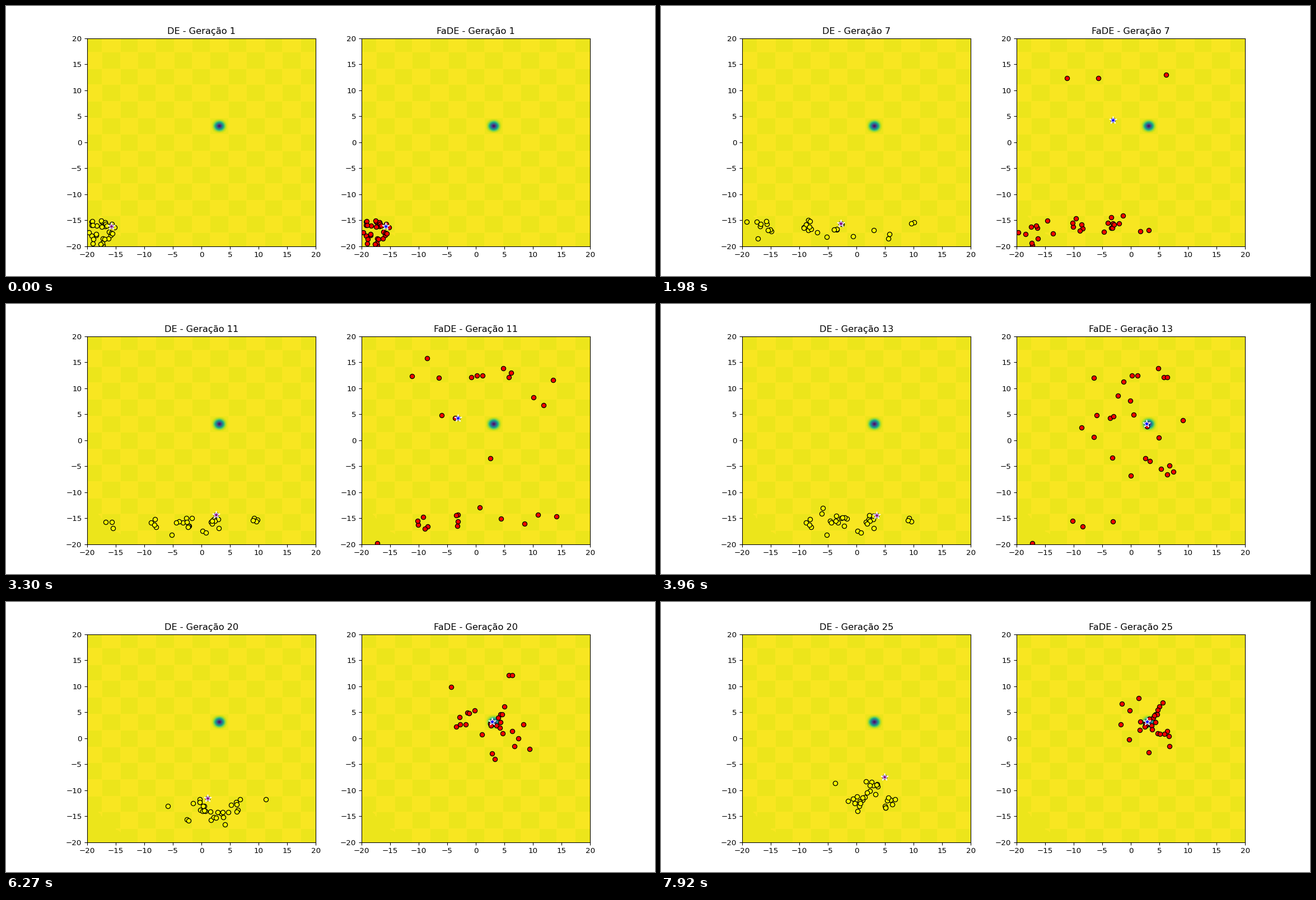
Animation of 1159x483 px, one loop 8000 ms. Source, as a matplotlib script:

```python
import numpy as np
import matplotlib.pyplot as plt
from matplotlib.animation import FuncAnimation

W, H, DPI = 1159, 483, 96.6
STEP = 40             # ms per drawn frame
LOOP = 8000           # ms per loop
HOLD = 330            # ms per generation
GENS = 25
SIZE = 30             # points in a swarm
GOAL = np.array([np.pi, np.pi])


def easom(x, y):
    return -np.cos(x) * np.cos(y) * np.exp(-((x - np.pi) ** 2 + (y - np.pi) ** 2))


def dist(p):
    return np.hypot(*(np.asarray(p) - GOAL))


class Swarm:
    """Points wait in place until a trial nearer the goal takes their slot.

    drift: rows of generation, mean x, mean y, spread x, spread y of the trials
    stars: best position from a given generation on
    leap: generations in which some trials jump to the upper half
    """

    def __init__(self, drift, stars, seed, leap=()):
        self.drift = np.array(drift, float)
        self.stars = stars
        self.leap = leap
        self.rng = np.random.default_rng(seed)
        pts = np.random.default_rng(1).uniform(-19.9, -15, (SIZE, 2))
        self.history = [pts]
        for gen in range(1, GENS):
            pts = self.evolve(pts.copy(), gen)
            self.history.append(pts)

    def best(self, gen):
        return [s for start, s in self.stars if start <= gen][-1]

    def trial(self, gen):
        t = self.drift[:, 0]
        mx, my, sx, sy = (np.interp(gen, t, col) for col in self.drift[:, 1:].T)
        for _ in range(50):
            x, y = self.rng.normal((mx, my), (sx, sy))
            if gen in self.leap and self.rng.random() < 0.3:
                y = -y - 2.5
            # only the darker squares have a negative cost
            if max(abs(x), abs(y)) < 20 and np.cos(x) * np.cos(y) > 0:
                break
        return np.clip((x, y), -19.8, 19.8)

    def evolve(self, pts, gen):
        limit = dist(self.best(gen))
        for i in range(SIZE):
            p = self.trial(gen)
            if self.rng.random() < 0.4 and limit < dist(p) < dist(pts[i]):
                pts[i] = p
        return pts

    def at(self, gen):
        return np.vstack([self.history[gen], self.best(gen)])


de = Swarm(
    [(0, -12, -17, 4, 1), (4, -7, -16.6, 7, 1), (8, 0, -16, 7, 1.2),
     (12, 1, -15, 6, 1.2), (19, 2.5, -13.8, 2.5, 1.6), (24, 2.7, -11, 2.8, 1.6)],
    [(0, (-15.8, -16.1)), (3, (-2.75, -15.65)), (7, (2.55, -14.35)),
     (11, (3.55, -14.4)), (14, (0.85, -11.75)), (18, (1.05, -11.5)),
     (22, (4.9, -7.4))], 4)
fade = Swarm(
    [(0, -13, -17, 4, 1), (4, -8, -16.6, 7, 1), (8, 1, -14.8, 9, 1.5),
     (9, 3.5, 4.5, 8, 6.5), (15, 1, 4, 5, 5.5), (24, 3.3, 2, 4, 4)],
    [(0, (-15.8, -16.1)), (3, (-2.65, -15.65)), (6, (-3.15, 4.3)),
     (11, (2.75, 3.25)), (14, (2.8, 3.2))], 9, leap=(6, 7, 8))

# the tiny margin keeps the pixel size from rounding down
fig, axes = plt.subplots(1, 2, figsize=((W + 0.01) / DPI, (H + 0.01) / DPI), dpi=DPI)
grid = np.linspace(-20, 20, 200)
X, Y = np.meshgrid(grid, grid)
Z = easom(X, Y)
levels = np.arange(-50, 2) / 50


def panel(ax, name, swarm, fill, star_fill):
    ax.contourf(X, Y, Z, levels=levels, cmap="viridis", vmin=-1, vmax=0.02)
    ax.set(xlim=(-20, 20), ylim=(-20, 20))
    dots = ax.scatter([], [], s=36, c=fill, edgecolors="black", linewidths=1,
                      zorder=2)
    star = ax.scatter([], [], s=100, c=star_fill, marker="*", edgecolors="white",
                      linewidths=1, zorder=2.2)
    return ax.set_title(""), name, swarm, dots, star


panels = [panel(axes[0], "DE", de, "yellow", "purple"),
          panel(axes[1], "FaDE", fade, "red", "blue")]


def draw(i):
    gen = min(GENS - 1, (STEP * (i + 1) - 1) // HOLD)
    for title, name, swarm, dots, star in panels:
        title.set_text(f"{name} - Geração {gen + 1}")
        dots.set_offsets(swarm.at(gen))
        star.set_offsets([swarm.best(gen)])


anim = FuncAnimation(fig, draw, frames=LOOP // STEP, interval=STEP, repeat=True)
plt.show()
```
